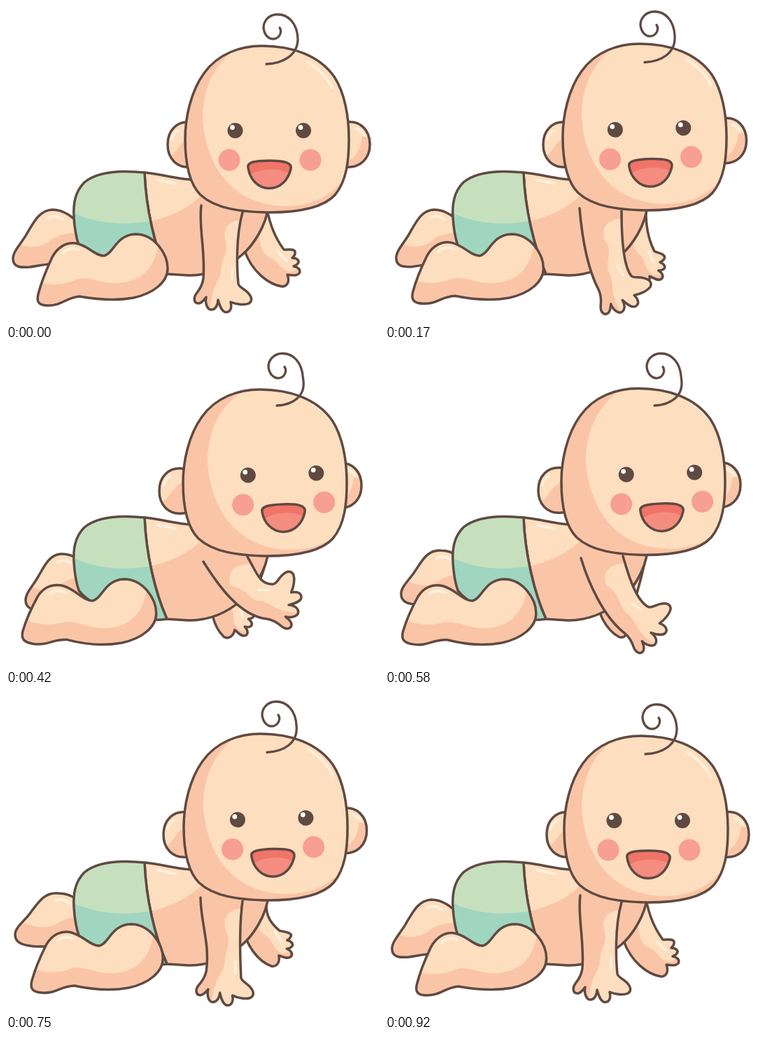
Write an HTML page with a canvas that moves like this. It is 533 px wide and 453 px high and loops after 960 ms.

```html
<!DOCTYPE html>
<html lang="en">
<head>
<meta charset="utf-8">
<title>Crawling baby</title>
<style>
html, body { margin: 0; width: 100%; height: 100%; overflow: hidden; background: #fff; }
canvas { display: block; }
</style>
</head>
<body>
<canvas id="stage" width="533" height="453"></canvas>
<script>
const ctx = document.getElementById('stage').getContext('2d');
const LINE = '#5f4a42', LIGHT = '#fddebf', MID = '#fac5a6', SHINE = '#feefdc';
const LOOP = 960, STEPS = 23;
const KEYS = [0, 4, 6, 10, 14, 18, 22];   // steps at which poses are given
let step = 0;

const clamp = v => Math.max(0, Math.min(1, v));

// Smooth periodic interpolation through six poses; the last key repeats the first.
function key(...v) {
  v.push(v[0]);
  const n = KEYS.length;
  const at = i => KEYS[(i + n) % n] + STEPS * Math.floor(i / n);
  const val = i => v[(i + n) % n];
  const slope = i => (val(i + 1) - val(i)) / (at(i + 1) - at(i));
  const tangent = i => {
    const a = slope(i - 1), b = slope(i);
    if (a * b === 0) return 0;
    const p = at(i) - at(i - 1), q = at(i + 1) - at(i);
    return (a * q + b * p) / (p + q);
  };
  let i = n - 1;
  while (at(i) > step) i--;
  const h = at(i + 1) - at(i), u = (step - at(i)) / h;
  const s = u * u * (3 - 2 * u);
  return val(i) * (1 - s) + val(i + 1) * s
    + h * u * (1 - u) * ((1 - u) * tangent(i) - u * tangent(i + 1));
}

// Applies a point mapping to every "x,y" pair of a path.
const warp = (d, map) =>
  d.replace(/(-?[\d.]+),(-?[\d.]+)/g, (_, x, y) => map(+x, +y).join());
const shift = (dx, dy) => (x, y) => [x + dx, y + dy];

function turn(cx, cy, degrees) {
  const a = degrees * Math.PI / 180, c = Math.cos(a), s = Math.sin(a);
  return (x, y) => [cx + x * c - y * s, cy + x * s + y * c];
}

function fill(d, color) {
  ctx.fillStyle = color;
  ctx.fill(new Path2D(d));
}

function stroke(d, color = LINE, width = 3.5) {
  ctx.strokeStyle = color;
  ctx.lineWidth = width;
  ctx.stroke(new Path2D(d));
}

function dot(x, y, r, color) {
  ctx.fillStyle = color;
  ctx.beginPath();
  ctx.arc(x, y, r, 0, 7);
  ctx.fill();
}

// Outlined shape with an inner area of another tone and an optional highlight.
function shape(d, base, inner, tone, map = shift(0, 0), shine) {
  const outline = warp(d, map);
  fill(outline, base);
  ctx.save();
  ctx.clip(new Path2D(outline));
  fill(warp(inner, map), tone);
  if (shine) stroke(warp(shine, map), SHINE, 4);
  ctx.restore();
  stroke(outline);
}

function backLeg() {
  const fx = key(0, 6, 11, 18, 13, 3), fy = key(0, -1, -3, -5, -14, -20);
  const kx = key(0, 4, 8, 14, 14, 10), ky = key(0, 0, 0, -1, -6, -9);
  const map = (x, y) => {
    const w = clamp((x - 10) / 56);
    return [x + fx + (kx - fx) * w, y + fy + (ky - fy) * w];
  };
  shape('M112,320 C98,302 82,291 66,291 C48,292 40,308 30,325 C23,338 10,350 10,361 C10,374 22,374 34,373 C50,371 60,367 80,368 L115,360Z',
    MID, 'M5,335 C30,348 48,346 62,336 C76,325 90,324 112,324 L112,280 L5,280Z', LIGHT, map,
    'M60,303 C66,299 74,300 81,305');
}

function backArm() {
  const hand = turn(395 + key(0, -17, -35, -63, -48, -8), 365 + key(0, 1, 9, 14, 10, -14),
    key(0, 20, 25, 35, 20, 12));
  const elbow = key(0, -7, -7, 0, 0, -11);
  const map = (x, y) => {
    const w = clamp((y - 300) / 50), [hx, hy] = hand(x - 395, y - 365);
    return [x + (hx - x) * w + elbow * 4 * w * (1 - w), y + (hy - y) * w];
  };
  shape('M373,290 C377,312 385,332 397,348 C402,349 411,346 413,351 C414,356 411,358 409,360 C416,360 420,364 417,368 C416,370 413,371 411,372 C417,373 422,377 419,382 C415,387 408,384 402,384 C405,391 404,400 395,401 C375,398 352,380 341,350 L345,310',
    MID, 'M360,290 C362,330 360,352 378,360 C390,364 392,380 408,380 L425,372 L420,340 L385,290Z', LIGHT, map,
    'M389,351 C394,357 398,360 401,363');
}

function body() {
  shape('M198,238 C225,241 245,247 264,248 L300,240 L375,285 C372,315 352,343 338,355 C315,375 290,385 262,385 L230,383 C213,345 200,290 198,238Z',
    MID, 'M204,308 C235,301 260,290 282,268 L300,230 L198,230Z', LIGHT, undefined,
    'M217,249 C226,250 234,252 242,254');
  shape('M198,238 C160,234 130,237 112,252 C98,266 96,284 97,302 C98,318 100,330 104,342 C118,362 150,372 190,382 Q212,386 230,383 C213,345 200,290 198,238Z',
    '#c6e0bd', 'M90,293 C130,312 165,314 210,307 L240,390 L90,390Z', '#a0d6c0');
}

function frontLeg() {
  const p = (1 - Math.cos(step / STEPS * 2 * Math.PI)) / 2;
  const map = (x, y) => {
    const w = clamp((120 - x) / 75);
    return [x - p * (17 + 6 * w), y - p * 12.5 * w];
  };
  shape('M140,357 C154,354 157,327 185,326 C212,326 231,354 231,375 C231,395 210,411 182,417 C155,422 128,419 105,415 C85,417 80,428 60,428 C48,428 43,424 46,412 C50,396 58,376 66,359 C74,344 87,337 100,339 C117,342 127,357 140,357Z',
    MID, 'M40,391 C62,402 85,398 100,391 C115,385 130,394 150,396 C185,398 212,382 218,338 L200,300 L40,300Z', LIGHT, map,
    'M82,353 C87,347 95,345 103,348');
}

function frontArm() {
  const hand = turn(key(303, 326, 354, 379, 359, 307), key(395, 399, 390, 362, 389, 399),
    key(0, -32, -57, -88, -57, 3));
  const at = (x, y) => hand(x, y).join();
  const sx = key(279, 278, 279, 282, 280, 278), sy = key(285, 289, 294, 301, 296, 288);
  const rx = key(338, 338, 339, 345, 340, 338), ry = key(295, 293, 293, 294, 293, 293);
  const leftBend = [sx + key(-4, 3, 8, 20, 10, 0), sy + key(30, 35, 35, 32, 33, 35)];
  const rightBend = [rx + key(-10, 0, 8, 12, 8, -5), ry + key(35, 30, 28, 20, 28, 35)];
  const fingers = warp('C-22,4 -27,11 -31,16 C-36,23 -34,30 -28,30 C-23,30 -20,25 -17,21 C-19,30 -15,39 -10,39 C-3,39 0,31 0,25 C2,33 6,42 11,42.5 C18,43 20,36 18,28 C25,31 37,33 44,30 C50,26 48,20 42,14 C37,9 30,7 29,2', hand);
  const light = `M${rx + 20},${ry + 10} C${rx - 10},${ry + 8} ${rx - 32},${ry + 15} ${rx - 24},${ry + 42} `
    + `C${rightBend[0] - 10},${rightBend[1] + 25} ${at(4, -34)} ${at(4, -14)} C${at(2, 0)} ${at(-12, 8)} ${at(-11, 45)} L${at(60, 45)} L${at(60, -20)}Z`;
  shape(`M${sx},${sy} C${leftBend} ${at(-18, -45)} ${at(-21, -6)} ${fingers} C${at(27, -18)} ${rightBend} ${rx},${ry}`,
    MID, light, LIGHT);
  stroke(`M${at(20, -20)} L${at(20, -4)}`, SHINE, 3.5);
}

function head() {
  const hx = key(0, -2, -4, -3, -4, -2), hy = key(0, -3, -3.5, -2, -3.5, -3);
  const fx = key(0, 2, 10, 19, 18, 4), fy = key(0, -2.5, -3, -2, -3, -2.5);
  const look = (fx - hx) * .45;

  shape('M285,168 L264,166 C244,164 231,178 231,198 C231,218 244,232 264,230 L285,228Z',
    LIGHT, 'M234,214 C246,210 246,195 264,186 L285,186 L285,235 L235,235Z', MID,
    shift(key(0, -5, -9, -12, -12, -6), key(0, 0, 1, 2, 1, 0)), 'M237,190 Q239,181 246,178');
  shape('M485,166 C507,163 520,178 520,198 C520,218 506,232 485,230Z',
    LIGHT, 'M480,222 C498,222 506,208 509,186 L525,190 L515,235 L480,235Z', MID,
    shift(key(0, -3.5, -9, -12, -12, -4.5), key(0, -5.5, -6.5, -5.5, -6.5, -5.5)), 'M500,175 Q507,177 511,184');

  ctx.save();
  ctx.translate(hx, hy);
  shape('M256,190 C256,160 264,122 283,96 C303,68 335,57 366,57 C408,57 447,70 469,101 C484,124 490,158 490,190 C490,220 487,250 470,270 C452,290 415,295 375,295 C335,294 300,290 278,270 C260,252 256,220 256,190Z',
    MID, warp('M345,50 C300,75 281,115 281,160 C285,225 320,285 400,286 C440,286 470,270 492,235 L510,40Z', shift(look, 0)), LIGHT,
    undefined, warp('M431,80 Q455,94 466,117', shift(look * 1.1, -look * .2)));
  ctx.restore();

  ctx.save();
  ctx.translate(376 + fx, 200 + fy);
  ctx.rotate(key(0, -1.6, -1.8, -1.8, -1.8, -1.6) * Math.PI / 180);
  ctx.translate(-376, -200);
  for (const x of [327.5, 425]) {
    dot(x, 178, 11, LINE);
    dot(x - 4, 173.5, 3.4, '#fff');
  }
  dot(319, 220, 15.5, '#f69f92');
  dot(435, 220, 15.5, '#f69f92');
  shape('M346,231 C344,223 356,221 377,221 C398,221 409,224 407,233 C403,249 392,260.5 376,260.5 C360,260.5 348,247 346,231Z',
    '#f17468', 'M340,250 C352,229 402,228 412,247 L400,270 L350,270Z', '#f48d80');
  ctx.restore();
}

function hair() {
  const rx = key(0, -1, 6, 15, 13, 1), ry = key(0, -2.5, -4, -5, -5, -2.5);
  const cx = key(0, -3, 1.5, 7, 6, -2), cy = key(0, -4, -6, -8.5, -8.5, -4);
  stroke(warp('M372,83 C395,82 417,71 417,47 C416,24 403,12 388,12 C375,12 368,22 368,31 C369,42 376,48 383,47 C391,46 395,37 391,31', (x, y) => {
    const w = clamp((y - 45) / 38);
    return [x + cx + (rx - cx) * w, y + cy + (ry - cy) * w];
  }), LINE, 3.3);
}

const start = performance.now();

function draw() {
  // 24 drawings per second, starting on rounded hundredths
  const time = (performance.now() - start) % LOOP;
  step = Math.min(STEPS - 1, Math.floor((time + 5) * .024));
  ctx.clearRect(0, 0, 533, 453);
  ctx.lineCap = ctx.lineJoin = 'round';
  [backLeg, backArm, body, frontLeg, frontArm, head, hair].forEach(part => part());
  requestAnimationFrame(draw);
}
draw();
</script>
</body>
</html>
```
